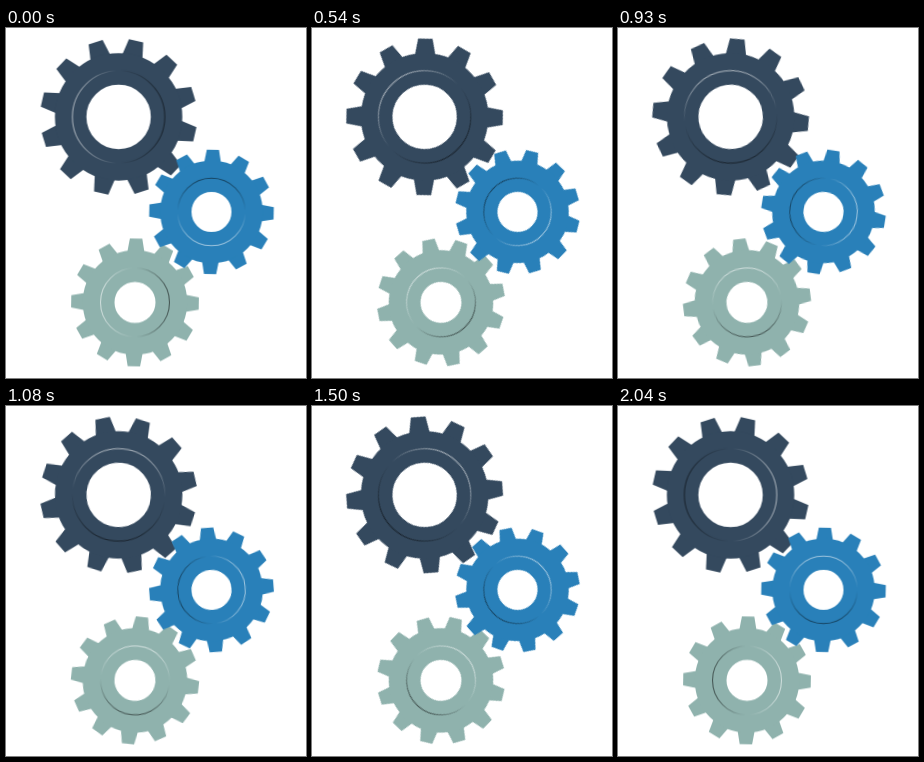
Animation of 300 by 350 pixels, one loop 2.07 s. Source, as an HTML page:

```html
<!DOCTYPE html>
<html lang="en">
<head>
<meta charset="utf-8">
<title>Gears</title>
<style>
  html, body { margin: 0; width: 100%; height: 100%; overflow: hidden; background: #fff; }
  svg { display: block; width: 300px; height: 350px; }
  .spin { animation: turn 2070ms steps(69, jump-none) infinite; }
  .back { --to: -180deg; }
  @keyframes turn {
    from { transform: rotate(0deg); }
    to { transform: rotate(var(--to, 180deg)); }
  }
</style>
</head>
<body>
<svg id="stage" viewBox="0 0 300 350">
  <defs>
    <linearGradient id="bevel">
      <stop offset="0" stop-color="#fff" stop-opacity=".55"/>
      <stop offset=".48" stop-color="#fff" stop-opacity="0"/>
      <stop offset=".52" stop-color="#000" stop-opacity="0"/>
      <stop offset="1" stop-color="#000" stop-opacity=".5"/>
    </linearGradient>
  </defs>
</svg>
<script>
  const TEETH = 12;

  // phase: angle of the first tooth; light: turn of the bevel, 0 = lit from the left
  const gears = [
    { x: 112.6, y: 88.9, color: '#34495e', hole: 32.2, body: 63.7, tip: 78.2, top: 7.3, base: 10.3, ring: 46.2, phase: 12.9, light: 0 },
    { x: 129, y: 274.4, color: '#8fb2ad', hole: 20.5, body: 52.2, tip: 63.8, top: 6.2, base: 8.6, ring: 34.5, phase: 1, light: 0 },
    { x: 205.5, y: 183.9, color: '#2980b9', hole: 20, body: 51.2, tip: 62.2, top: 6.1, base: 8.4, ring: 33.8, phase: 1.3, light: -90, back: true }
  ];

  function drawGear(g) {
    const root = g.body - 2;
    const points = `${-g.base},${-root} ${-g.top},${-g.tip} ${g.top},${-g.tip} ${g.base},${-root}`;
    const teeth = Array.from({ length: TEETH }, (_, i) =>
      `<polygon points="${points}" transform="rotate(${g.phase + i * 360 / TEETH})"/>`).join('');
    return `<g transform="translate(${g.x} ${g.y})"><g class="spin${g.back ? ' back' : ''}">
      <g fill="${g.color}">${teeth}</g>
      <circle r="${(g.body + g.hole) / 2}" fill="none" stroke="${g.color}" stroke-width="${g.body - g.hole}"/>
      <circle r="${g.ring}" fill="none" stroke="url(#bevel)" stroke-width="1.1" transform="rotate(${g.light})"/>
    </g></g>`;
  }

  document.getElementById('stage').insertAdjacentHTML('beforeend', gears.map(drawGear).join(''));
</script>
</body>
</html>
```
